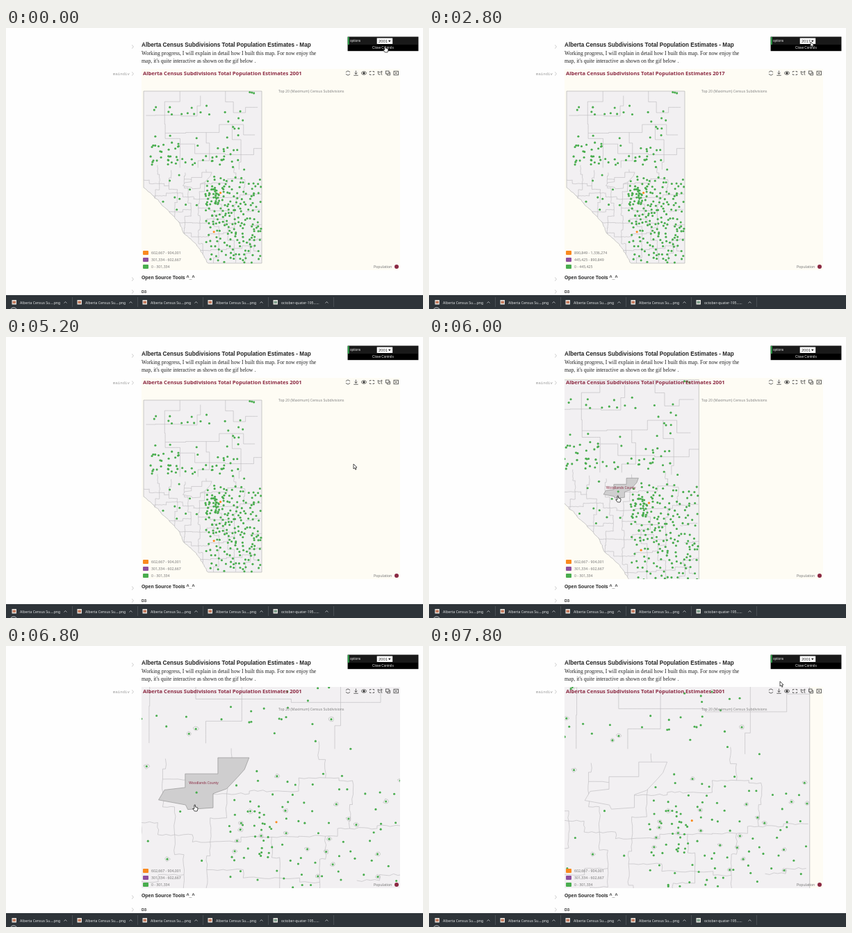
Write an HTML page with a canvas that moves like this. It is 600 px wide and 405 px high and loops after 8000 ms.

```html
<!DOCTYPE html>
<html lang="en">
<head>
<meta charset="utf-8">
<title>Census map</title>
<style>
html, body { margin: 0; width: 100%; height: 100%; overflow: hidden; background: #fefefe; }
canvas { display: block; }
</style>
</head>
<body>
<canvas id="stage" width="600" height="405"></canvas>
<script>
const c = document.getElementById('stage').getContext('2d');
const LOOP = 8000, STEP = 200;
const SANS = '"Liberation Sans", Arial, sans-serif';
const UI = '"Noto Sans", "Open Sans", sans-serif';
const SERIF = '"Liberation Serif", "Times New Roman", serif';
const MONO = '"Liberation Mono", monospace';
const MAROON = '#8b2942', GREEN = '#49ad4e', ORANGE = '#f98a1f', PURPLE = '#8f4f9f';
const LAND = '#f2f0f2', BORDER = '#b9b8ba';
const PIVOT = { x: 271, y: 230 };

let seed = 7;
const rnd = () => (seed = (seed * 16807) % 2147483647) / 2147483647;
const spread = size => (rnd() - .5) * size;
const range = n => Array.from({ length: n }, (_, i) => i);

// Adds small bends along every straight piece
function wiggle(points, size) {
  const out = [points[0]];
  for (let i = 1; i < points.length; i++) {
    const [ax, ay] = points[i - 1], [bx, by] = points[i];
    const n = Math.ceil(Math.hypot(bx - ax, by - ay) / 2.5);
    for (let k = 1; k < n; k++) {
      out.push([ax + (bx - ax) * k / n + spread(size), ay + (by - ay) * k / n + spread(size)]);
    }
    out.push([bx, by]);
  }
  return out;
}

// County borders: a jittered grid whose edges run in survey steps
function lattice(x, y, w, h, cols, rows, bend) {
  const dx = w / cols, dy = h / rows, edges = [];
  const node = range(rows + 1).map(j => range(cols + 1).map(i =>
    [x + i * dx + spread(dx * .6), y + j * dy + spread(dy * .6)]));
  for (let j = 0; j < rows; j++) {
    for (let i = 0; i < cols; i++) {
      const a = node[j][i], right = node[j][i + 1], down = node[j + 1][i];
      const mx = (a[0] + right[0]) / 2, my = (a[1] + down[1]) / 2;
      if (j && rnd() < .85) edges.push([a, [mx, a[1]], [mx, right[1]], right]);
      if (i && rnd() < .85) edges.push([a, [a[0], my], [down[0], my], down]);
    }
  }
  return edges.map(e => wiggle(e, bend));
}

// Keeps the candidate farthest from the towns so far
function scatter(list, x, y, w, h, count, tries) {
  const gap = p => Math.min(99, ...list.map(q => Math.hypot(p[0] - q[0], p[1] - q[1])));
  for (let i = 0; i < count; i++) {
    const options = range(tries).map(() => [x + rnd() * w, y + rnd() * h]);
    list.push(options.reduce((a, b) => (gap(b) > gap(a) ? b : a)));
  }
}

const foothills = wiggle([[291, 339], [274, 312], [255, 295], [249, 280], [222, 252], [211, 241], [198, 230]], 1.6);
const shore = [[198, 91], [368, 91], [368, 339], ...foothills];
const borders = [
  ...lattice(198, 91, 170, 112, 4, 4, 0),
  ...lattice(198, 203, 170, 136, 8, 7, .9)
];
const county = [[281.8, 208], [296.1, 208], [294, 213.4], [290.8, 217], [285.8, 222.3], [279.6, 224.5],
  [279.6, 231], [268, 231.8], [267, 229.7], [254.6, 227.4], [257.3, 222.8], [266.8, 221.7], [266.8, 215.4], [281.8, 215.4]];

const towns = [];
scatter(towns, 336, 92, 22, 3, 3, 2);
scatter(towns, 206, 112, 90, 14, 12, 2);
scatter(towns, 315, 120, 34, 38, 10, 2);
scatter(towns, 204, 155, 78, 30, 18, 1);
scatter(towns, 204, 184, 110, 17, 30, 1);
scatter(towns, 298, 172, 48, 32, 12, 1);
scatter(towns, 226, 209, 54, 56, 9, 3);
scatter(towns, 287, 214, 80, 52, 85, 3);
scatter(towns, 286, 232, 28, 24, 22, 1);
scatter(towns, 288, 266, 79, 44, 75, 3);
scatter(towns, 294, 308, 72, 30, 36, 3);
const cities = [[308.6, 237.6], [299.2, 293.8]];
const limits = towns.filter((p, i) => i % 5 === 0).map(([x, y]) =>
  range(7).map(k => {
    const a = k * Math.PI * 2 / 7, r = .7 + rnd() * .5;
    return [x + Math.cos(a) * r * 1.2, y + Math.sin(a) * r];
  }));

function text(s, x, y, size, color, family = UI, weight = '') {
  c.font = `${weight} ${size}px ${family}`;
  c.fillStyle = color;
  c.fillText(s, x, y);
}
function box(x, y, w, h, color) {
  c.fillStyle = color;
  c.fillRect(x, y, w, h);
}
function frame(x, y, w, h) {
  c.strokeRect(x, y, w, h);
}
function trace(points, closed) {
  c.beginPath();
  points.forEach(([x, y]) => c.lineTo(x, y));
  if (closed) c.closePath();
}
function line(color, width, ...points) {
  trace(points);
  c.strokeStyle = color;
  c.lineWidth = width;
  c.stroke();
}
function dot(x, y, r, color) {
  c.beginPath();
  c.arc(x, y, r, 0, Math.PI * 2);
  c.fillStyle = color;
  c.fill();
}

function drawMap(zoom, hover) {
  const at = ([x, y]) => [PIVOT.x + (x - PIVOT.x) * zoom, PIVOT.y + (y - PIVOT.y) * zoom];
  const shape = (points, closed, stroke, fill) => {
    trace(points.map(at), closed);
    if (fill) { c.fillStyle = fill; c.fill(); }
    c.strokeStyle = stroke;
    c.stroke();
  };
  c.save();
  c.beginPath();
  c.rect(195, 59, 372, 290);
  c.clip();
  box(195, 59, 372, 290, '#fefcf4');
  c.lineWidth = .6;
  shape(shore, true, '#aaa', LAND);
  c.save();
  c.clip();
  borders.forEach(b => shape(b, false, BORDER));
  c.restore();
  shape(county, true, hover ? '#888' : BORDER, hover ? '#cfcecf' : LAND);
  if (zoom > 1) limits.forEach(l => shape(l, true, '#b2b5b2'));
  towns.forEach(p => dot(...at(p), 1.55, GREEN));
  cities.forEach(p => dot(...at(p), 1.6, ORANGE));
  if (hover) {
    dot(...at([272, 224]), 1.55, GREEN);
    c.textAlign = 'center';
    const [x, y] = at([275.3, 219.6]);
    text('Woodlands County', x, y + 1.8, 4.8, MAROON);
    c.textAlign = 'left';
  }
  c.restore();
}

function drawTools() {
  const ink = '#444', w = .8, y = 65;
  c.strokeStyle = ink;
  c.lineWidth = w;
  // Restore
  for (const a of [.3, Math.PI + .3]) {
    c.beginPath();
    c.arc(492, y, 3, a, a + 2.5);
    c.stroke();
  }
  // Save
  line(ink, w, [503.5, y - 3.5], [503.5, y + 1.5]);
  line(ink, w, [501.5, y - .5], [503.5, y + 1.7], [505.5, y - .5]);
  line(ink, w, [500.3, y + 3.3], [506.7, y + 3.3]);
  // View
  c.beginPath();
  c.ellipse(515, y, 3.5, 2.3, 0, 0, Math.PI * 2);
  c.stroke();
  dot(515, y, 1.5, '#222');
  // Box select, lasso
  for (const sx of [-1, 1]) {
    for (const sy of [-1, 1]) {
      line(ink, w, [526.5 + sx, y + sy * 2.5], [526.5 + sx * 3, y + sy * 2.5], [526.5 + sx * 3, y + sy]);
    }
  }
  line(ink, w, [541, y + 3], [540, y + 1], [541, y - 3], [538, y - 1], [535, y - 2.5], [536, y + 2], [538.5, y + 2]);
  // Keep, clear
  frame(546.5, y - 3, 4.5, 4);
  line(ink, w, [548.3, y + 1], [548.3, y + 3], [552.6, y + 3], [552.6, y - 1], [551, y - 1]);
  frame(558, y - 2.8, 6.4, 5.6);
  for (const s of [-1, 1]) line(ink, w, [561.2 - 1.4, y - 1.4 * s], [561.2 + 1.4, y + 1.4 * s]);
}

function drawChart(year, zoom, hover) {
  drawMap(zoom, hover);
  text('Alberta Census Subdivisions Total Population Estimates ' + year, 197, 68, 7.58, MAROON, UI, 'bold');
  text('Top 20 (Maximum) Census Subdivisions', 392, 93.2, 5.12, '#858585');
  drawTools();
  // Three equal classes up to the largest city
  const top = year === 2017 ? 1336274 : 904001;
  const third = k => Math.floor(top * k / 3 + .5).toLocaleString('en-US');
  [ORANGE, PURPLE, GREEN].forEach((color, i) => {
    c.beginPath();
    c.roundRect(197, 321 + i * 10, 8, 6, 1);
    c.fillStyle = color;
    c.fill();
    text(`${third(2 - i)} - ${third(3 - i)}`, 209, 326 + i * 10, 5.2, '#777');
  });
  text('Population', 529, 346, 5.15, '#777');
  dot(562, 344, 3, MAROON);
}

function drawPage() {
  box(0, 0, 600, 405, '#fefefe');
  [27, 66, 362, 380].forEach(y => line('#bbb', .8, [181, y - 2.5], [183.6, y], [181, y + 2.5]));
  text('Alberta Census Subdivisions Total Population Estimates - Map', 195, 27.3, 8.2, '#222', SANS, 'bold');
  text('Working progress, I will explain in detail how I built this map. For now enjoy the', 195, 39.4, 7.72, '#222', SERIF);
  text("map, it's quite interactive as shown on the gif below .", 195, 49.6, 7.72, '#222', SERIF);
  text('maindiv', 154, 67.6, 5.7, '#999', MONO);
  text('Open Source Tools ^_^', 195, 361.7, 6.9, '#222', SANS, 'bold');
  text('D3', 195, 382.2, 5.6, '#222', SANS, 'bold');
}

function drawTaskbar() {
  box(0, 385, 600, 20, '#2e3439');
  for (let i = 0; i < 5; i++) {
    const x = i * 94, image = i < 4;
    box(x + 8.5, 392, 6.5, 6.5, '#e8e6e2');
    box(x + 9.5, 393.5, 4.5, 3.5, image ? '#c47a5c' : '#7fa08c');
    text(image ? 'Alberta Census Su....png' : 'october-quater-195......', x + 20, 397.7, 5.1, '#e2e4e5');
    line('#c8cccf', .8, [x + 83.5, 396.5], [x + 85.5, 394.5], [x + 87.5, 396.5]);
    line('#50565b', .8, [x + 95.5, 388], [x + 95.5, 402]);
  }
  c.beginPath();
  c.arc(11, 408.5, 5.5, Math.PI, Math.PI * 2);
  c.strokeStyle = '#c6cacd';
  c.lineWidth = 1;
  c.stroke();
}

function drawControls(year, open, mouseY) {
  box(491.6, 12.6, 101.8, 20.6, '#000');
  box(494, 13, 99, 11, '#191919');
  box(491.8, 13, 2, 11, '#2fa24a');
  text('options', 495, 20, 4.7, '#eee', SANS);
  text('Close Controls', 527, 30.3, 4.7, '#eee', SANS);
  box(533.7, 14.5, 22.5, 8.5, '#fff');
  text(year, 536, 21, 5.8, '#222', SANS);
  trace([[550, 17.7], [553.6, 17.7], [551.8, 20.6]], true);
  c.fillStyle = '#222';
  c.fill();
  if (!open) return;
  const top = 23, row = 6.88;
  box(533.5, top, 23, row * 17 + 1, '#8a9097');
  box(534, top + .4, 22, row * 17, '#fff');
  const picked = Math.max(0, Math.min(16, Math.floor((mouseY - top) / row)));
  for (let i = 0; i < 17; i++) {
    if (i === picked) box(534, top + i * row + .2, 22, row, '#1e90ff');
    text(2001 + i, 536, top + i * row + 5.5, 5.5, i === picked ? '#fff' : '#222', SANS);
  }
}

const ARROW = [[0, 0], [0, 7], [1.6, 5.6], [2.8, 8.2], [4, 7.7], [2.9, 5.2], [5, 5]];
const HAND = [[0, 0], [1.3, 0], [1.5, 3], [4.6, 3.8], [5, 6], [4, 9], [.2, 9], [-2.3, 5.4], [-.2, 5.5]];
function drawCursor(x, y, hand) {
  c.save();
  c.translate(x, y);
  trace(hand ? HAND : ARROW, true);
  c.fillStyle = '#fff';
  c.fill();
  c.strokeStyle = '#222';
  c.lineWidth = .8;
  c.stroke();
  c.restore();
}

// Pointer stops: time, x, y
const stops = [
  [0, 545, 26], [400, 548, 21], [1000, 552, 121], [1400, 546, 136], [2000, 490, 145], [2800, 549, 20],
  [3600, 548, 26], [4200, 510, 230], [5200, 500, 183], [5600, 271, 229], [7000, 271, 229], [7800, 505, 51]
];
function mouse(t) {
  const i = Math.max(1, stops.findIndex(s => s[0] >= t));
  const a = stops[i - 1], b = stops[i], k = (t - a[0]) / (b[0] - a[0]);
  return [a[1] + (b[1] - a[1]) * k, a[2] + (b[2] - a[2]) * k];
}

// Wheel clicks speed up, then one click back
function wheel(t) {
  if (t >= 7000) return 11;
  const n = Math.max(0, (t - 5600) / STEP);
  return Math.ceil(n * n / 3);
}

function draw(now) {
  const t = Math.floor((now % LOOP) / STEP) * STEP;
  const year = t >= 1400 && t < 3600 ? 2017 : 2001;
  const open = (t >= 400 && t < 1400) || (t >= 3000 && t < 3600);
  const overMap = t >= 5600 && t <= 7000;
  const [x, y] = mouse(t);
  drawPage();
  drawChart(year, 1.1 ** wheel(t), overMap);
  drawTaskbar();
  drawControls(year, open, y);
  drawCursor(x, y, t === 0 || overMap);
  requestAnimationFrame(draw);
}
requestAnimationFrame(draw);
</script>
</body>
</html>
```
